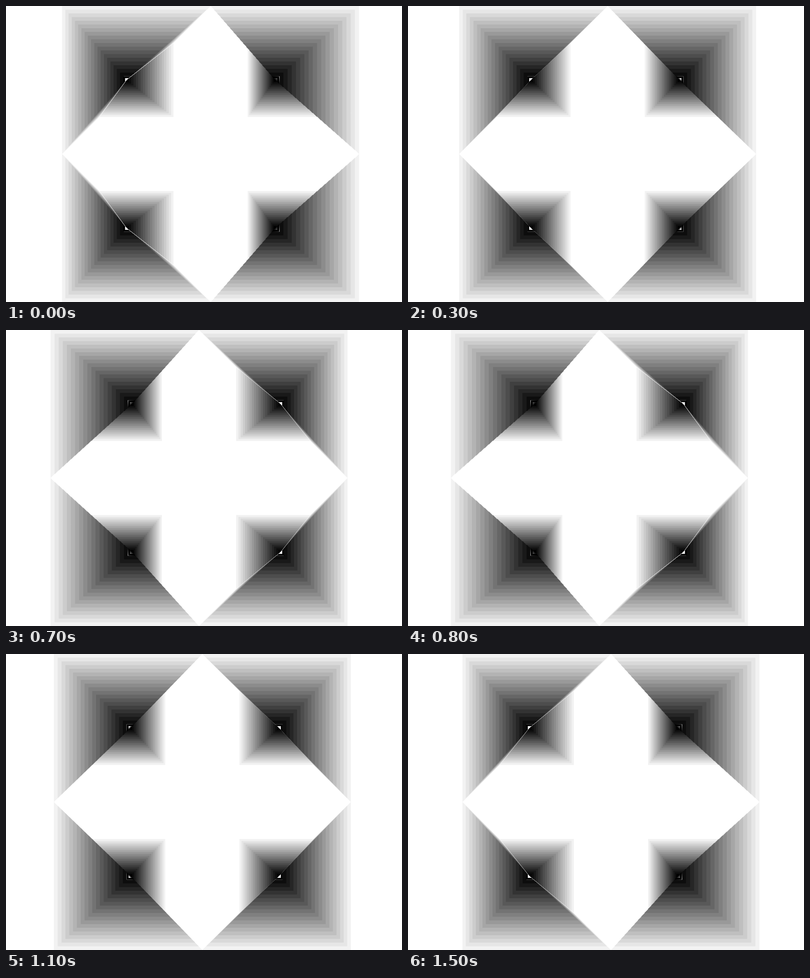
These frames come from a looping animation (800 by 600 pixels, 1600 ms). An HTML page with a canvas:

```html
<!DOCTYPE html>
<html lang="en">
<head>
<meta charset="utf-8">
<title>Sliding pyramids</title>
<style>
  html, body { margin: 0; width: 100%; height: 100%; overflow: hidden; background: #fff; }
  canvas { display: block; }
</style>
</head>
<body>
<canvas id="stage" width="800" height="600"></canvas>
<script>
const ctx = document.getElementById('stage').getContext('2d');
const LOOP = 1600, STEP = 100, LEVELS = 20;

// Corner triangle combined with a half-size square; their overlap stays empty.
function drawLevel(x, y, sx, sy, half) {
  ctx.beginPath();
  ctx.moveTo(x - sx * half, y - sy * half);
  ctx.lineTo(x + sx * half, y - sy * half);
  ctx.lineTo(x - sx * half, y + sy * half);
  ctx.closePath();
  ctx.rect(x - half / 2, y - half / 2, half, half);
  ctx.fill('evenodd');
}

function draw(time) {
  const t = Math.floor(time % LOOP / STEP) * STEP;
  const slide = Math.abs(t - LOOP / 2) / (LOOP / 4) - 1; // 1 .. -1 .. 1
  ctx.fillStyle = '#fff';
  ctx.fillRect(0, 0, 800, 600);
  for (let k = 0; k < LEVELS; k++) {
    const gray = Math.round(255 * (1 - (k + 1) / LEVELS));
    const shift = slide * (40 / 3 - k);
    const half = 150 * (1 - k / LEVELS);
    ctx.fillStyle = `rgb(${gray}, ${gray}, ${gray})`;
    for (const sx of [1, -1])
      for (const sy of [1, -1])
        drawLevel(400 - sx * 150 + shift, 300 - sy * 150, sx, sy, half);
  }
}

const start = performance.now();
function tick() {
  draw(performance.now() - start);
  requestAnimationFrame(tick);
}
tick();
</script>
</body>
</html>
```
